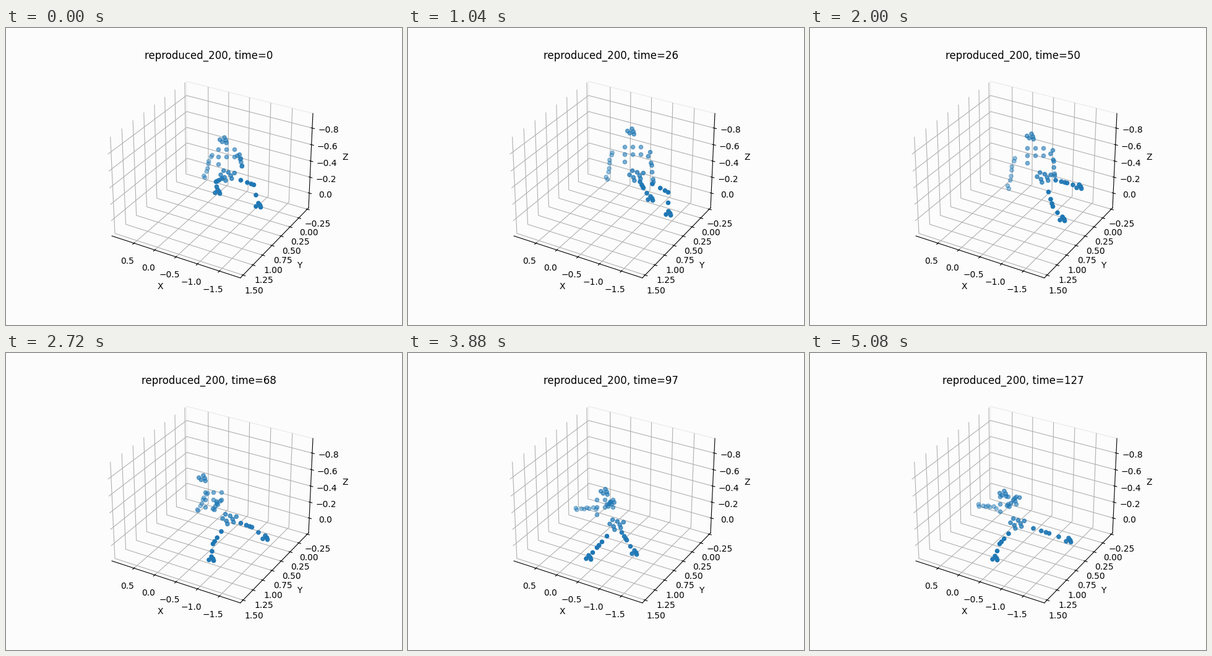
Recreate the animation shown at these times as a matplotlib script. Size 640 px wide and 480 px high, loop 5.12 s.

```python
import numpy as np
import matplotlib.pyplot as plt
from matplotlib.animation import FuncAnimation
from matplotlib.colors import to_rgba

FRAMES = 128
BG = "#fcfcfc"
BLUE = "#1f77b4"

# A jointed figure: the place of each joint, in stage pixels, at the key times.
KEYS = np.array([0, 26, 50, 68, 84, 97, 127])
JOINTS = {
    "head": [(352, 181), (361, 167), (357, 175), (318, 202), (314, 222), (318, 224), (313, 227)],
    "chest": [(356, 203), (363, 199), (364, 201), (335, 232), (324, 234), (318, 244), (320, 239)],
    "shoulder": [(330, 205), (327, 201), (328, 210), (323, 226), (298, 255), (301, 252), (298, 251)],
    "hand_l": [(318, 242), (319, 245), (318, 260), (307, 255), (265, 260), (268, 251), (269, 245)],
    "hand_r": [(382, 224), (397, 250), (396, 240), (335, 253), (322, 238), (322, 246), (319, 248)],
    "pelvis": [(358, 238), (369, 238), (378, 241), (361, 268), (336, 273), (337, 277), (335, 275)],
    "knee_l": [(400, 253), (420, 265), (392, 288), (334, 308), (314, 312), (305, 314), (306, 308)],
    "foot_l": [(407, 286), (420, 299), (407, 308), (331, 332), (304, 330), (291, 330), (298, 331)],
    "knee_r": [(339, 248), (380, 258), (415, 250), (397, 281), (336, 307), (353, 302), (386, 291)],
    "foot_r": [(341, 264), (391, 275), (434, 256), (418, 298), (343, 330), (365, 322), (417, 302)],
}
# Extra swings between the keys: joint, start, end, dx, dy.
SWINGS = [
    ("foot_l", 2, 20, 30, -12),
    ("hand_l", 14, 26, -14, -4),
    ("foot_r", 30, 50, 12, 0),
    ("foot_r", 50, 62, 6, 0),
    ("foot_l", 68, 84, 0, 5),
]


def disc(n, rx, ry):
    """Spread n offsets evenly over an ellipse."""
    k = np.arange(n)
    turn = 2.4 * k
    radius = np.sqrt((k + 0.8) / n)[:, None]
    return radius * np.column_stack([rx * np.cos(turn), ry * np.sin(turn)])


def chain(points, at):
    """Points along a chain of joints; at=1 is the second joint, and so on."""
    points = np.array(points)
    steps = np.arange(len(points))
    return np.column_stack([np.interp(at, steps, points[:, i]) for i in (0, 1)])


rng = np.random.default_rng(4)
HEAD = disc(5, 7, 6)
HIPS = disc(8, 15, 9)
CHEST = np.array([(13 * (k % 3 - 1), 12 * (k // 3) - 7) for k in range(7)])
ARM_L = rng.uniform(-3, 3, (8, 2))
ARM_R = rng.uniform(-3, 3, (7, 2))
LEG_AT = [0.5, 0.75, 0.9, 1, 1.5, 2, 2, 2, 2]
LEG = np.vstack([np.zeros((5, 2)), disc(4, 7, 4)])
OPACITY = np.repeat([0.45, 0.58, 0.65, 0.67, 0.74, 0.93, 1],
                    [8, 7, 7, 5, 8, 9, 9])


def joint_at(name, t):
    """Cubic Hermite through the key places, flat at turning points."""
    vals = np.array(JOINTS[name], float)
    slopes = np.diff(vals, axis=0) / np.diff(KEYS)[:, None]
    tan = np.zeros_like(vals)
    a, b = slopes[:-1], slopes[1:]
    same = a * b > 0
    tan[1:-1] = np.where(same, 2 * a * b / np.where(same, a + b, 1), 0)
    i = min(np.searchsorted(KEYS, t, side="right") - 1, len(KEYS) - 2)
    h = KEYS[i + 1] - KEYS[i]
    s = (t - KEYS[i]) / h
    place = ((1 + 2 * s) * (1 - s) ** 2 * vals[i] + s * (1 - s) ** 2 * h * tan[i]
             + s * s * (3 - 2 * s) * vals[i + 1] + s * s * (s - 1) * h * tan[i + 1])
    for joint, start, end, dx, dy in SWINGS:
        if joint == name and start < t < end:
            lift = np.sin(np.pi * (t - start) / (end - start)) ** 2
            place = place + lift * np.array([dx, dy])
    return place


def markers(t):
    j = {name: joint_at(name, t) for name in JOINTS}
    shoulder_r = j["chest"] + 0.7 * (j["chest"] - j["shoulder"])
    return np.vstack([
        chain([j["shoulder"], j["hand_l"]], np.linspace(0, 1, 8)) + ARM_L,
        j["chest"] + CHEST,
        chain([shoulder_r, j["hand_r"]], np.linspace(0, 1, 7)) + ARM_R,
        j["head"] + HEAD,
        j["pelvis"] + HIPS,
        chain([j["pelvis"], j["knee_r"], j["foot_r"]], LEG_AT) + LEG,
        chain([j["pelvis"], j["knee_l"], j["foot_l"]], LEG_AT) + LEG,
    ])


fig = plt.figure(figsize=(6.4, 4.8), dpi=100, facecolor=BG)
ax = fig.add_subplot(projection="3d", facecolor=BG)
ax.set(xlim=(1.042, -1.969), ylim=(1.568, -0.289), zlim=(0.189, -0.974),
       xlabel="X", ylabel="Y", zlabel="Z")
ax.set_xticks(np.arange(-1.5, 0.6, 0.5))
ax.set_yticks(np.arange(-0.25, 1.6, 0.25))
ax.set_zticks([-0.8, -0.6, -0.4, -0.2, 0.0])
for axis in (ax.xaxis, ax.yaxis, ax.zaxis):
    axis.set_pane_color(to_rgba(BG))
ax.yaxis.pane.set_edgecolor("#ececec")
title = ax.set_title("")

# Markers live on a flat layer measured in stage pixels.
layer = fig.add_axes([0, 0, 1, 1])
layer.set(xlim=(0, 640), ylim=(480, 0))
layer.axis("off")
colors = [to_rgba(BLUE, a) for a in OPACITY]
dots = layer.scatter(*markers(0).T, s=20, c=colors)


def draw(n):
    dots.set_offsets(markers(n) + 0.5)
    title.set_text(f"reproduced_200, time={n}")
    return dots, title


anim = FuncAnimation(fig, draw, frames=FRAMES, interval=40, repeat=True,
                     repeat_delay=0, blit=False)
plt.show()
```
